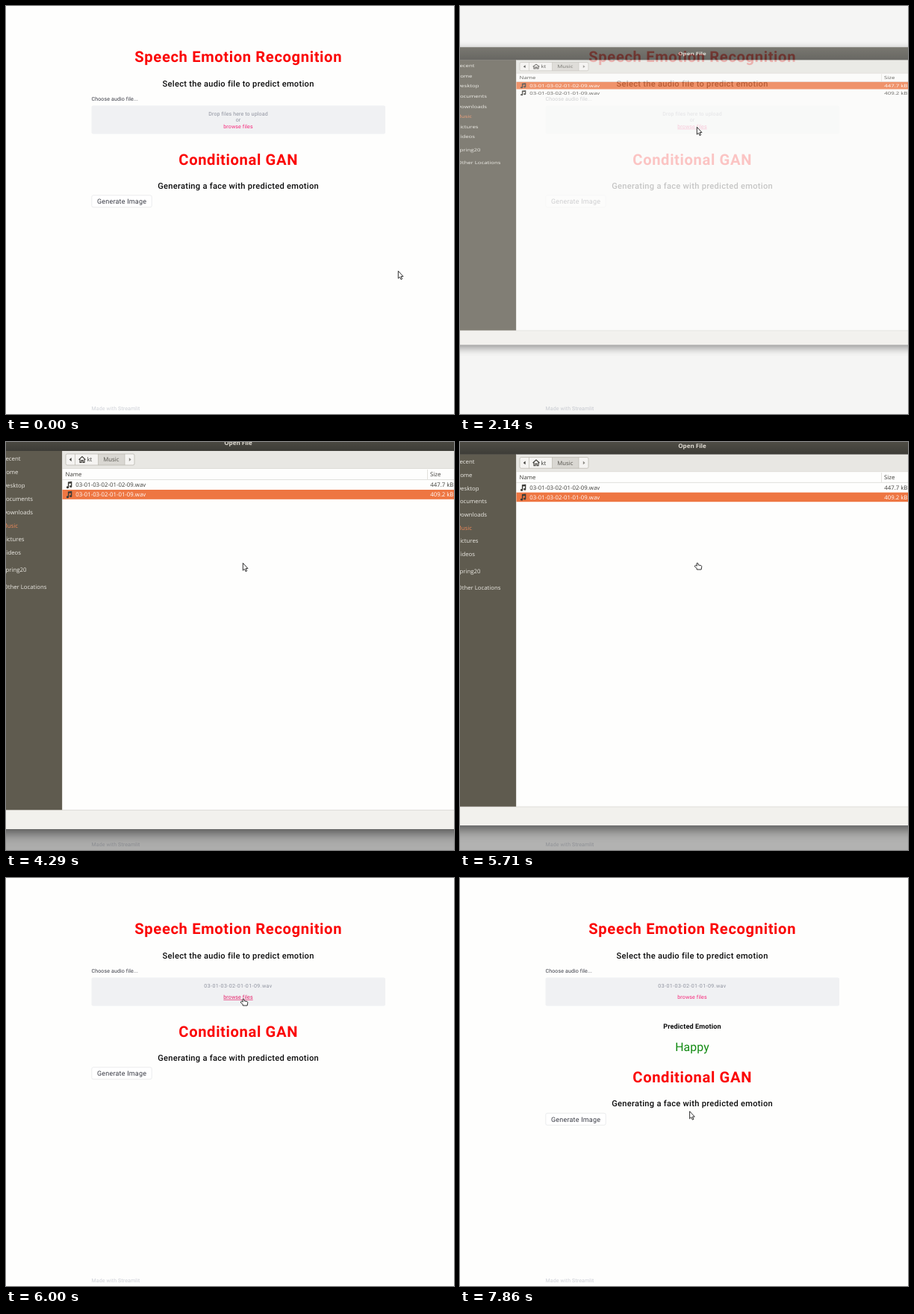
An HTML page that plays this animation: 600x547 px, repeating every 8 s.

```html
<!DOCTYPE html>
<html lang="en">
<head>
<meta charset="utf-8">
<title>Speech Emotion Recognition</title>
<style>
html, body { margin: 0; width: 100%; height: 100%; overflow: hidden; background: #fefefd; }
svg { display: block; width: 600px; height: 547px; }
text { text-rendering: geometricPrecision; }
#page { font: 7.05px Roboto, sans-serif; letter-spacing: .017em; fill: #8f939f; }
#page .mid, .mid { text-anchor: middle; }
#page .h1 { font-size: 20.2px; font-weight: 700; letter-spacing: .031em; fill: #fb0505; }
#page .h2 { font-size: 11.1px; font-weight: 500; letter-spacing: .025em; fill: #0b0b0c; }
.ink { fill: #3a3c46; }
.link { fill: #f6287a; }
.link.hover { fill: #e41c66; text-decoration: underline; }
.file { letter-spacing: .058em; }
.btn { font-size: 9px; letter-spacing: .022em; }
#dialog { font: 7.8px "Open Sans", sans-serif; fill: #3c3b37; }
#dialog .frame { fill: #f2f1ed; filter: drop-shadow(0 5px 8px rgba(0, 0, 0, .55)); }
.side { text-anchor: end; fill: #eceae4; }
.side.on { fill: #f08a5a; }
.row rect { fill: none; }
.row.on rect { fill: #ee7642; }
.row.on { fill: #fff; }
</style>
</head>
<body>
<svg viewBox="0 0 600 547">
  <defs>
    <linearGradient id="bar" x1="0" y1="0" x2="0" y2="1">
      <stop offset="0" stop-color="#55534a"/><stop offset="1" stop-color="#3d3c37"/>
    </linearGradient>
    <path id="note" d="M2.6 0.6L8 0V6.6A1.6 1.4 0 1 1 6.6 5.4V2.6L4 3V7.8A1.7 1.4 0 1 1 2.6 6.6Z"/>
  </defs>
  <rect width="600" height="547" fill="#fefefd"/>

  <g id="page">
    <text class="mid h1" x="311.2" y="75.4">Speech Emotion Recognition</text>
    <text class="mid h2" x="311.1" y="107.5">Select the audio file to predict emotion</text>
    <text class="ink" x="114.5" y="126.6">Choose audio file...</text>
    <rect x="114.5" y="133.5" width="393.5" height="38" rx="2" fill="#f0f1f3"/>
    <g id="empty">
      <text class="mid" x="311" y="146.8">Drop files here to upload</text>
      <text class="mid" x="311" y="155.3">or</text>
    </g>
    <text id="chosen" class="mid file" x="311" y="146.8">03-01-03-02-01-01-09.wav</text>
    <text id="browse" class="mid link" x="311" y="163.6">browse files</text>
    <g id="result">
      <text class="mid" x="311" y="202" font-size="9.1" font-weight="700" fill="#0b0b0c">Predicted Emotion</text>
      <text class="mid" x="311" y="231.5" font-size="15.8" fill="#118a11">Happy</text>
    </g>
    <g id="gan">
      <text class="mid h1" x="311.2" y="212.7">Conditional GAN</text>
      <text class="mid h2" x="311.1" y="244.7">Generating a face with predicted emotion</text>
      <g id="generate">
        <rect x="114.8" y="253.8" width="80.4" height="16" rx="2.2" fill="#fff" stroke="#e6e7ea" stroke-width=".8"/>
        <text class="ink btn mid" x="155.1" y="265">Generate Image</text>
      </g>
    </g>
    <text x="114.5" y="542.4" fill="#d0d3d9">Made with <tspan fill="#cbced5">Streamlit</tspan></text>
  </g>

  <rect id="dim" width="600" height="547"/>

  <g id="dialog">
    <rect class="frame" x="-100" y="-11" width="800" height="530"/>
    <rect x="-100" y="-11" width="800" height="23.3" fill="url(#bar)"/>
    <text class="mid" x="311" y="3.6" font-size="8" font-weight="700" fill="#dfdbd2">Open File</text>
    <rect x="75" y="12" width="525" height="23.5" fill="#e8e7e3"/>
    <rect x="75" y="35.5" width="525" height="458" fill="#fefefd"/>
    <rect y="12" width="75" height="481.5" fill="#5f5b4f"/>
    <path d="M75.5 12V493.5M0 493.5H600M75 35.5H600M564.5 37V50M75 50.5H600" fill="none" stroke="#cfcdc7" stroke-width=".6"/>

    <rect x="80" y="16" width="92" height="15" rx="2" fill="#f5f4f2"/>
    <rect x="123.5" y="16" width="35.5" height="15" fill="#d9d7d2"/>
    <path d="M92.5 16V31M123.5 16V31M159 16V31" stroke="#bbb8b0" stroke-width=".7"/>
    <rect x="80" y="16" width="92" height="15" rx="2" fill="none" stroke="#b5b2aa" stroke-width=".7"/>
    <path d="M87.6 21V26L84.8 23.5Z"/>
    <path d="M164.8 21V26L167.6 23.5Z" fill="#8f8d87"/>
    <path d="M97.6 23.6L102 19.6L106.4 23.6M99 23V27.4H101V24.6H103V27.4H105V23" fill="none" stroke="#3c3b37" stroke-width="1.1"/>
    <text x="108.5" y="26.3">kt</text>
    <text x="130.3" y="26.3" fill="#55534d">Music</text>
    <text x="79.5" y="45.6">Name</text>
    <text x="568" y="45.6">Size</text>
  </g>

  <g id="cursor" stroke="#1a1a1a" stroke-width=".9" stroke-linejoin="round" fill="#fff">
    <path id="arrow" d="M.3 .3V10.2L2.5 8.2L4 11.6L5.6 10.9L4.1 7.6H7Z"/>
    <path id="hand" d="M.2 9V7.4L-2.5 5.2Q-3.1 3.7 -1.6 3.4L.3 4.2L-.1 1Q.5 -.6 1.7 .5L2.3 3L5.8 3.5Q6.9 4 6.7 5.6L6.1 9Z"/>
  </g>
</svg>
<script>
const $ = id => document.getElementById(id);
const dialog = $('dialog');

function add(parent, tag, attrs, text = '') {
  const el = document.createElementNS(parent.namespaceURI, tag);
  for (const k in attrs) el.setAttribute(k, attrs[k]);
  el.textContent = text;
  return parent.appendChild(el);
}

// Sidebar labels run off the left edge: name, right end, middle
[['Recent', 19.5, 22], ['Home', 16.5, 40.3], ['Desktop', 25.5, 58.3], ['Documents', 36, 76.3],
 ['Downloads', 36, 94.4], ['Music', 16, 112.4], ['Pictures', 24.5, 130.4], ['Videos', 20, 148.4],
 ['Spring20', 27.5, 171.5], ['Other Locations', 54.5, 194.5]].forEach(([name, x, y]) =>
  add(dialog, 'text', { class: name === 'Music' ? 'side on' : 'side', x, y: y + 2.7 }, name));

const rows = [['03-01-03-02-01-02-09.wav', '447.7 kB'], ['03-01-03-02-01-01-09.wav', '409.2 kB']]
  .map(([name, size], i) => {
    const row = add(dialog, 'g', { class: 'row', transform: `translate(0 ${51 + 13 * i})` });
    add(row, 'rect', { x: 75.5, width: 524.5, height: 12.8 });
    add(row, 'use', { href: '#note', x: 80.3, y: 1.8, fill: '#3c3b37' });
    add(row, 'text', { x: 93.3, y: 9.2 }, name);
    add(row, 'text', { x: 568.3, y: 9.2 }, size);
    return row;
  });

const RATE = 7, LOOP = 8000;
// Pointer stops: tick, x, y
const stops = [[0, 525, 355], [2, 254, 238], [7, 254, 238], [13, 317, 162],
               [43, 317, 162], [48, 381, 331], [53, 381, 331], [55, 307.3, 312.5]];

const clamp = v => Math.min(1, Math.max(0, v));
const show = (id, on) => { $(id).style.display = on ? '' : 'none'; };

function pointer(n) {
  let i = 0;
  while (i < stops.length - 2 && n > stops[i + 1][0]) i++;
  const [a, ax, ay] = stops[i], [b, bx, by] = stops[i + 1];
  const p = clamp((n - a) / (b - a)), e = p * p * (3 - 2 * p);
  return [ax + (bx - ax) * e, ay + (by - ay) * e];
}

// The dialog unfolds and folds over a quarter second, easing out
function unfold(n) {
  if (n < 15 || n > 41) return 0;
  if (n < 40) return 1 - (1 - clamp(.503 + (n - 15) * 4 / RATE)) ** 2;
  return (1 - clamp(.0095 + (n - 40) * 4 / RATE)) ** 2;
}

function shade(n) {
  if (n < 15 || n > 41) return 0;
  return n < 40 ? .035 + .285 * clamp((n - 15) / 4) : n === 40 ? .3 : .1;
}

function draw(t) {
  const n = Math.floor((t + 5) * RATE / 1000) % (LOOP * RATE / 1000);
  const loaded = n >= 42, done = n >= 46;

  show('empty', !loaded);
  show('chosen', loaded);
  show('result', done);
  $('browse').setAttribute('y', loaded ? 161.9 : 163.6);
  $('browse').classList.toggle('hover', n >= 13 && n < 44);
  $('gan').setAttribute('transform', `translate(0 ${done ? 61.5 : 0})`);
  $('generate').setAttribute('opacity', done && n < 52 ? .35 : 1);

  const s = unfold(n);
  show('dialog', s > 0);
  dialog.setAttribute('transform', `translate(0 ${257 * (1 - s)}) scale(1 ${s})`);
  dialog.setAttribute('opacity', clamp(s * 1.02));
  $('dim').setAttribute('opacity', shade(n));
  rows.forEach((row, i) => row.classList.toggle('on', i === (n < 30 ? 0 : 1)));

  const hand = n === 13 || n === 14 || (n >= 40 && n < 44);
  show('hand', hand);
  show('arrow', !hand);
  $('cursor').setAttribute('transform', `translate(${pointer(n)})`);
}

function loop(now) {
  draw(now % LOOP);
  requestAnimationFrame(loop);
}
draw(0);
requestAnimationFrame(loop);
</script>
</body>
</html>
```
